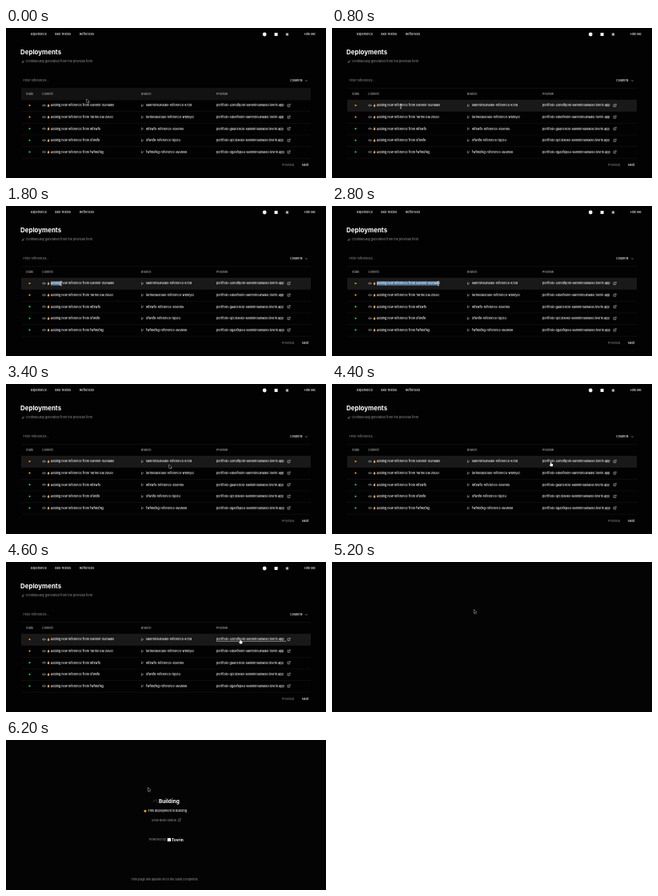
Animation, 400 px wide and 188 px high, one loop 6.4 s. Source, as an HTML page with a canvas:

```html
<!DOCTYPE html>
<html lang="en">
<head>
<meta charset="utf-8">
<title>Deployments</title>
<style>
html, body { margin: 0; width: 100%; height: 100%; overflow: hidden; background: #000; }
canvas { display: block; width: 400px; height: 188px; }
</style>
</head>
<body>
<canvas></canvas>
<script>
const LOOP = 6400, STEP = 200;
const ORANGE = '#f59e2b', GREEN = '#22c55e', WHITE = '#f4f4f4', GREY = '#858585';
const canvas = document.querySelector('canvas');
const c = canvas.getContext('2d');
const ratio = window.devicePixelRatio || 1;
canvas.width = 400 * ratio;
canvas.height = 188 * ratio;

const ROWS = [
  [ORANGE, 'Sammir Oulhadel', 'sammiroulhadel', 'k72d', '42mdfqohi'],
  [ORANGE, 'Tarine Dal Zouel', 'tarinedalzouel', 'wbmy4i', '5d58fvoim'],
  [GREEN, 'wfxwfx', 'wfxwfx', '836hn5', 'gaun3hcsi'],
  [GREEN, 'xfwxfk', 'xfwxfk', 'tq2zu', 'qzc3ix6sb'],
  [GREEN, 'fwfwxfkg', 'fwfwxfkg', 'avumok', 'dg4sfsp64']
];

// Pointer path: time, x, y
const PATH = [
  [0, 101, 89], [200, 98, 95], [800, 86, 98], [1200, 56, 97], [1600, 56, 97],
  [2800, 133, 97], [3400, 204, 101], [3600, 204, 101], [4000, 235, 99.5],
  [4600, 293, 97], [4800, 293, 97], [5200, 177.5, 59.7], [LOOP, 177.5, 59.7]
];

function pointerAt(t) {
  const i = PATH.findIndex(p => p[0] > t);
  const [t0, x0, y0] = PATH[i - 1], [t1, x1, y1] = PATH[i];
  const k = (t - t0) / (t1 - t0);
  return [x0 + (x1 - x0) * k, y0 + (y1 - y0) * k];
}

// Drawn large and scaled down, so small sizes keep exact advances
function text(str, x, y, color = WHITE, size = 3.7, weight = 500) {
  c.save();
  c.translate(x, y + size * 0.36);
  c.scale(0.1, 0.1);
  c.font = `${weight} ${size * 10}px Inter, sans-serif`;
  c.fillStyle = color;
  c.fillText(str, 0, 0);
  c.restore();
}

function rect(x, y, w, h, color) {
  c.fillStyle = color;
  c.fillRect(x, y, w, h);
}

function dot(x, y, r, color) {
  c.fillStyle = color;
  c.beginPath();
  c.arc(x, y, r, 0, 7);
  c.fill();
}

function line(d, x, y, color = '#ccc', width = 0.5) {
  c.save();
  c.translate(x, y);
  c.strokeStyle = color;
  c.lineWidth = width;
  c.stroke(new Path2D(d));
  c.restore();
}

function shape(d, x, y, fill, edge) {
  line(d, x, y, edge, 0.8);
  c.save();
  c.translate(x, y);
  c.fillStyle = fill;
  c.fill(new Path2D(d));
  c.restore();
}

const externalIcon = (x, y, color) =>
  line('M1.4 -1.2H0V1.6H2.8V.2M1.2 .4L3.2 -1.6M1.9 -1.6H3.2V-.3', x, y, color);

function drawRow([color, name, user, id, host], i, t) {
  const y = 97 + i * 14.6;
  dot(29.5, y, 1.1, color);
  line('M0 0H1.4M3.6 0H5M3.6 0A1.1 1.1 0 1 1 1.4 0A1.1 1.1 0 1 1 3.6 0', 45, y);
  shape('M0 -1.6C.8 -.8 1.2 0 1 .7A1 1 0 0 1 -1 .7C-1 0 -.2 -.6 0 -1.6Z', 53, y, '#f0b45c', '#9c5420');
  text('Adding new reference from ' + name, 55.7, y);
  line('M.6 -1.8V1.8M.6 1Q2.6 1 2.6 -1', 169, y);
  text(`${user}-reference-${id}`, 175, y);
  text(`portfolio-${host}-sammiroulhadel.tovrin.app`, 263, y);
  if (i === 0 && t >= 4600) rect(263, y + 1.9, 87, 0.5, WHITE);
  externalIcon(352, y, '#ddd');
}

function drawTable(t, x) {
  text('Experience', 31, 8);
  text('Skill Testes', 61, 8);
  text('Refrences', 92, 8);
  dot(323.2, 8, 2.4, WHITE);
  rect(335.6, 6, 4, 4, WHITE);
  rect(349.8, 6.4, 3.2, 3.2, '#aaa');
  text('Hire Me', 373, 8);

  text('Deployments', 18, 29.8, '#fff', 7.9, 700);
  line('M0 1.6L2.6 -1.4M.2 0L1.6 1.4', 20, 42, '#999', 0.8);
  text('Continuously generated from the previous form', 24.5, 42, GREY);
  text('Filter references...', 21.5, 66, GREY);
  text('Columns', 355, 66);
  line('M0 -.7L1.3 .7L2.6 -.7', 374, 66);

  const hover = t < STEP ? 0 : 1;
  rect(19, 75.5 + hover * 14.5, 362, 14.5, hover ? '#191919' : '#121212');
  for (let i = 0; i < 7; i++) rect(19, 75.3 + i * 14.6, 362, 0.5, '#181818');

  [['State', 25], ['Commit', 45], ['Branch', 169], ['Preview', 263]]
    .forEach(([label, lx]) => text(label, lx, 82.5, '#a6a6a6'));
  if (t >= 1800 && t < 3000) rect(56, 94.3, x - 56, 5.4, '#4f7396');
  ROWS.forEach((row, i) => drawRow(row, i, t));

  text('Previous', 345, 172, '#777');
  text('Next', 370, 172);
  if (t >= 3800 && t < 4400) dot(278, 182, 6, '#f0701f');
}

function drawBuilding(t) {
  c.strokeStyle = '#454545';
  c.lineWidth = 0.7;
  c.beginPath();
  const a = t / STEP * 0.9;
  c.arc(186.8, 77.5, 2.3, a, a + 4.4);
  c.stroke();
  text('Building', 191, 77, '#fff', 6.5, 700);
  dot(174, 89, 1.6, ORANGE);
  text('This deployment is building', 177.5, 89);
  text('View Build Status', 182, 100.3, GREY);
  externalIcon(215.2, 100.3, GREY);
  text('Powered by', 179, 125, GREY);
  rect(201.8, 122.9, 4.2, 4.2, '#fff');
  text('Tovrin', 207, 125, '#fff', 4.8, 700);
  text('This page will update once the build completes.', 156.5, 175, GREY);
}

function drawPointer(t, x, y) {
  if (t >= 400 && t < 3000) {
    line('M-1 -2.8Q0 -2.8 0 -2Q0 -2.8 1 -2.8M0 -2V2M-1 2.8Q0 2.8 0 2Q0 2.8 1 2.8', x, y, '#ddd', 0.7);
  } else if (t >= 4400 && t < 5000) {
    shape('M-.6 0Q0 -.6 .5 0V1.8L2.5 2.4V4.5L1.8 5.5H-.6L-2 3.2L-1.6 2.8L-.6 3.4Z', x, y, '#fff', '#000');
  } else {
    shape('M0 0V4.4L1 3.5L1.8 5.2L2.5 4.9L1.8 3.2H3.1Z', x, y, '#000', '#ddd');
  }
}

function frame(now) {
  const t = Math.floor(now % LOOP / STEP) * STEP;
  const [x, y] = pointerAt(t);
  c.setTransform(ratio, 0, 0, ratio, 0, 0);
  rect(0, 0, 400, 188, t < 5000 ? '#020202' : '#030403');
  if (t < 5000) drawTable(t, x);
  else if (t >= 5600) drawBuilding(t);
  drawPointer(t, x, y);
  requestAnimationFrame(() => frame(performance.now() - start));
}

const start = performance.now();
frame(0);
</script>
</body>
</html>
```
